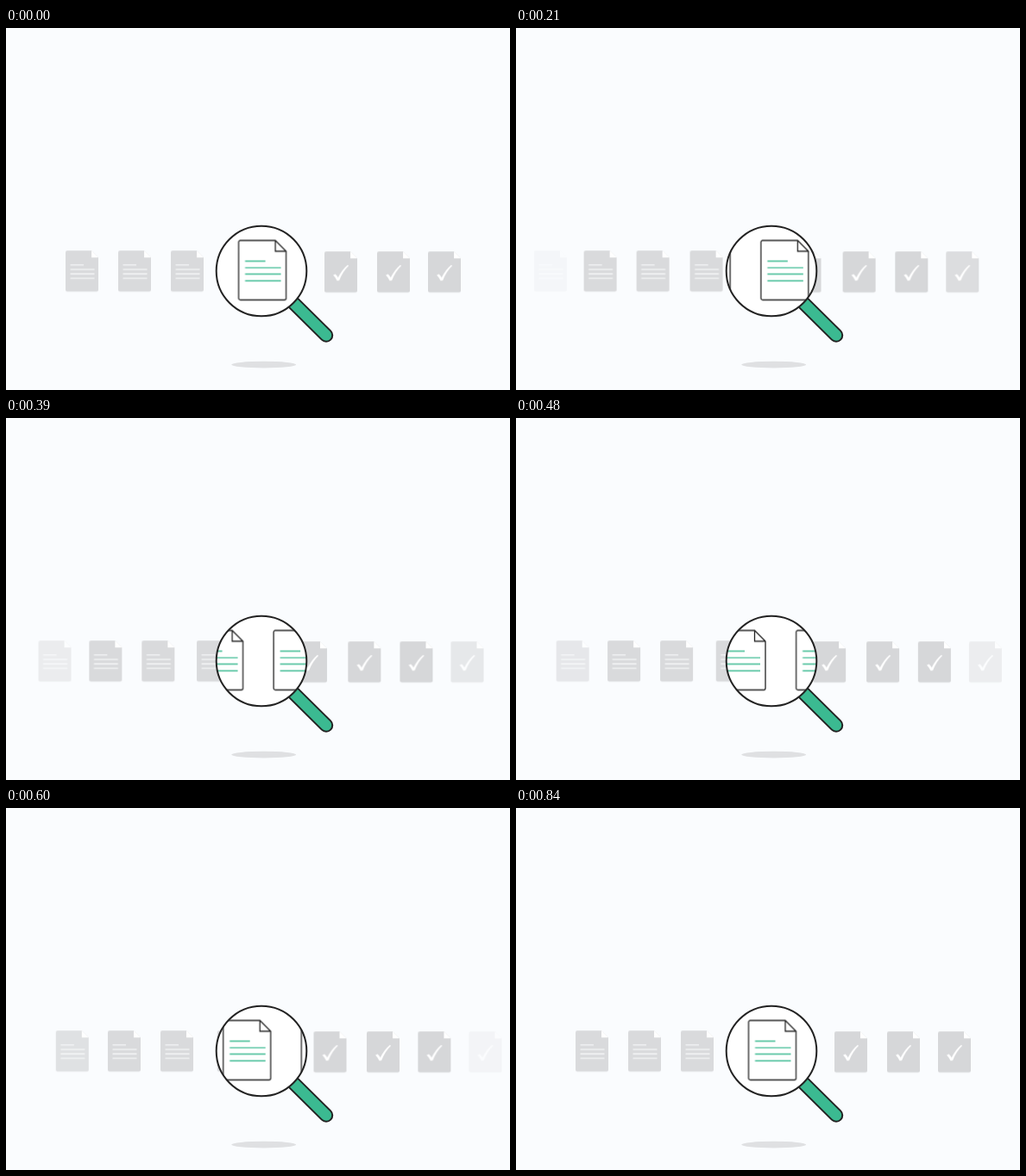
Recreate the animation shown at these times as an HTML page without scripts. Size 584 px wide and 420 px high, loop 0.9 s.

```html
<!DOCTYPE html>
<html lang="en">
<head>
<meta charset="utf-8">
<title>Document check</title>
<style>
  html, body { margin: 0; width: 100%; height: 100%; overflow: hidden; background: #fafcfe; }
  svg { display: block; width: 584px; height: 420px; }

  /* Every part glides for 840 ms, then rests for 60 ms. */
  .move, .enter, .leave {
    animation: slide 900ms cubic-bezier(.333, 0, .667, 1) infinite;
  }
  .enter { animation-name: slide, appear; }
  .leave { animation-name: slide, vanish; }

  @keyframes slide {
    from { transform: translateX(0); }
    93.333%, to { transform: translateX(var(--d)); }
  }
  @keyframes appear {
    from { opacity: 0; }
    93.333%, to { opacity: 1; }
  }
  @keyframes vanish {
    from { opacity: 1; }
    93.333%, to { opacity: 0; }
  }
</style>
</head>
<body>
<svg viewBox="0 0 584 420" xmlns="http://www.w3.org/2000/svg">
  <defs>
    <g id="sheet">
      <path d="M2 0H30L38 8V45.6a2 2 0 0 1-2 2H2a2 2 0 0 1-2-2V2a2 2 0 0 1 2-2z"/>
      <path d="M30 0V8H38z" fill="#fff"/>
    </g>
    <g id="pending">
      <use href="#sheet" fill="#d9dadc"/>
      <path d="M5.5 16.7H21M5.5 21.9H33.5M5.5 27H33.5M5.5 32.2H33.5" stroke="#f6f7f8" stroke-width="1.3"/>
    </g>
    <g id="checked">
      <use href="#sheet" fill="#d6d7d9"/>
      <path d="M10 27.5l2.5-1.2q2 1.3 3.2 4 4.500-9 11-14.500l1.500.8q-7 6.500-11 17l-2.600.5q-1.600-4-4.600-6.600z" fill="#fff"/>
    </g>
    <g id="page" fill="none">
      <path d="M2 0H42.500L55 12.500V67a2 2 0 0 1-2 2H2a2 2 0 0 1-2-2V2a2 2 0 0 1 2-2zM42.500 0V12.500H55" stroke="#222" stroke-width="1.3"/>
      <path d="M7.500 24H31M7.500 31.600H49M7.500 39H49M7.500 46.700H49" stroke="#3bba91" stroke-width="1.400"/>
    </g>
    <clipPath id="glass"><circle cx="296" cy="282" r="52"/></clipPath>
  </defs>

  <ellipse cx="298.700" cy="390.600" rx="37.500" ry="3.800" fill="#dfe0e2"/>

  <g transform="translate(0 258.300)">
    <g transform="translate(12)"><use class="enter" href="#pending" style="--d:57px"/></g>
    <g transform="translate(69)"><use class="move" href="#pending" style="--d:61px"/></g>
    <g transform="translate(130)"><use class="move" href="#pending" style="--d:61px"/></g>
    <g transform="translate(191)"><use class="move" href="#pending" style="--d:67px"/></g>
  </g>

  <g transform="translate(0 259.300)">
    <g transform="translate(305.500)"><use class="move" href="#checked" style="--d:63.5px"/></g>
    <g transform="translate(369)"><use class="move" href="#checked" style="--d:61px"/></g>
    <g transform="translate(430)"><use class="move" href="#checked" style="--d:59px"/></g>
    <g transform="translate(489)"><use class="leave" href="#checked" style="--d:59px"/></g>
  </g>

  <g stroke-linecap="round">
    <path d="M320 306L371 356.500" stroke="#222" stroke-width="16.500"/>
    <path d="M320 306L371 356.500" stroke="#3bba91" stroke-width="12.500"/>
  </g>
  <circle cx="296" cy="282" r="52" fill="#fff"/>
  <g clip-path="url(#glass)">
    <g transform="translate(178.900 246.500)"><use class="move" href="#page" style="--d:90.6px"/></g>
    <g transform="translate(269.500 246.500)"><use class="move" href="#page" style="--d:90.6px"/></g>
  </g>
  <circle cx="296" cy="282" r="52.300" fill="none" stroke="#222" stroke-width="2"/>
</svg>
</body>
</html>
```
